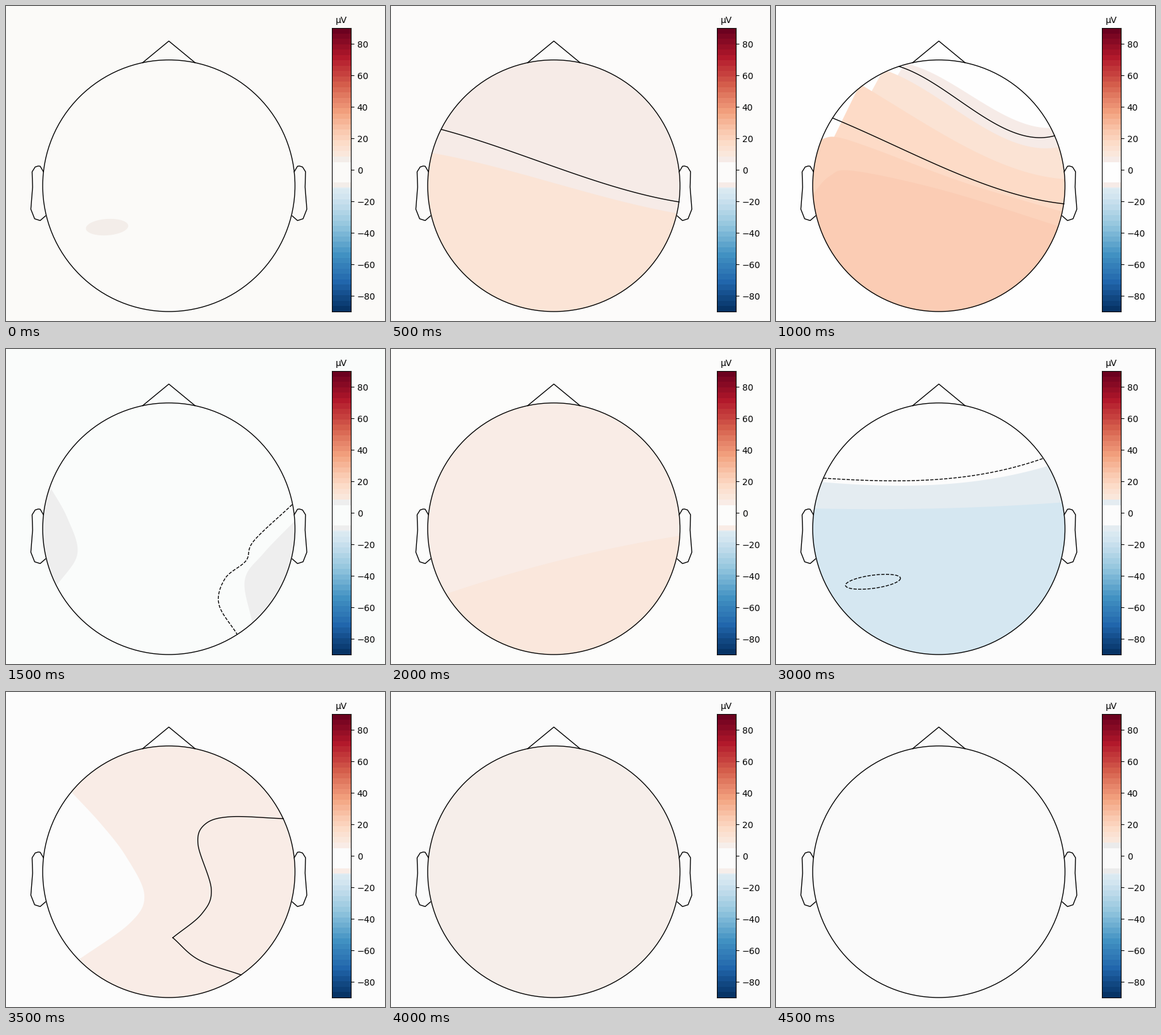
A matplotlib script that plays this animation: 600x500 px, repeating every 5000 ms.

```python
import numpy as np
import matplotlib
import matplotlib.pyplot as plt
from matplotlib.animation import FuncAnimation
from matplotlib.patches import Circle, Polygon

W, H, DPI = 600, 500, 100
CX, CY, R = 257.8, 285.3, 199.7
LIMIT = 90        # colour scale in microvolts
STEP = 3.4        # width of one colour band

# Corners that close a filled region on one side of its edge
DOWN = [(700, 600), (-100, 600)]
LEFT = [(-100, 600), (-100, 0)]
RIGHT = [(700, 600), (700, 200)]

plt.rcParams["font.family"] = "DejaVu Sans"
cmap = matplotlib.colormaps["RdBu_r"]
fig = plt.figure(figsize=(W / DPI, H / DPI), dpi=DPI)
ax = fig.add_axes([0, 0, 1, 1])
cax = fig.add_axes([516 / W, 15 / H, 30 / W, 450 / H])


def tint(uv):
    return cmap(0.5 + uv / (2 * LIMIT))


def swoop(start, end, bow=0, ease=0):
    """Edge from start to end: sagging by bow, flattened at its ends by ease."""
    u = np.linspace(0, 1, 60)
    s = u + ease * (u * u * (3 - 2 * u) - u)
    y = start[1] + (end[1] - start[1]) * s + 4 * bow * u * (1 - u)
    return np.c_[start[0] + (end[0] - start[0]) * u, y]


def through(*keys):
    """Catmull-Rom curve through a few key points."""
    p = np.array(keys, float)
    p = np.vstack([2 * p[0] - p[1], p, 2 * p[-1] - p[-2]])
    t = np.linspace(0, 1, 16)[:, None]
    return np.vstack([
        b + 0.5 * t * (c - a + t * (2 * a - 5 * b + 4 * c - d
                                    + t * (3 * (b - c) + d - a)))
        for a, b, c, d in zip(p, p[1:], p[2:], p[3:])])


def oval(x, y, rx, ry, tilt):
    a = np.linspace(0, 2 * np.pi, 80)
    return np.c_[x + rx * np.cos(a), y + ry * np.sin(a) - tilt * np.cos(a)]


def region(color, edge, corners=DOWN):
    return color, np.vstack([edge, corners])


def scene(bg, pale, fills=(), lines=(), style="-", base=None):
    return dict(bg=bg, pale=pale, fills=fills, lines=lines, style=style,
                base=base or bg)


def build():
    grey, warm, cool, rose = "#eeeeee", "#f9ece6", "#e4ecf1", "#f6ebe7"
    return [
        scene("#fbfaf8", "#f3ede9", [("#f3ede9", oval(160, 351, 33.5, 13, 2))]),
        scene("#fcfbfa", rose, base=rose,
              fills=[region(tint(12), swoop((58, 232), (458, 330), 0, 0.3))],
              lines=[swoop((80, 196), (456, 311), 5, 0.3)]),
        scene("#fefefe", rose, [
            region(rose, swoop((204, 91), (445, 193), 10, 0.9)),
            region(tint(13), swoop((170, 101), (452, 223), 20, 0.9)),
            region(tint(18), swoop((133, 124), (460, 275), 22, 0.3)),
            region(tint(20.5), through((70, 212), (95, 208), (150, 225),
                                       (300, 281), (458, 328))),
            region(tint(23), through((55, 303), (85, 270), (125, 262),
                                     (270, 294), (455, 352)))],
            [swoop((195, 96), (441, 206), 18, 0.95),
             swoop((90, 178), (456, 314), 14, 0.3)]),
        scene("#fafcfb", grey, [
            region(grey, through((68, 216), (97, 268), (113, 325), (80, 376)),
                   LEFT),
            region(grey, through((459, 271), (408, 324), (378, 367), (390, 435)),
                   RIGHT)],
            [through((453, 247), (392, 305), (380, 336), (347, 364), (337, 405),
                     (366, 453))], "--"),
        scene("#fcfcfb", warm, base=warm,
              fills=[region(tint(10), swoop((55, 400), (460, 296), -10))]),
        scene("#fefefc", warm, [
            region(warm, swoop((60, 230), (412, 151), 10)),
            region(tint(11.5), swoop((60, 338), (455, 228), -14, -0.3))],
            [swoop((59, 274), (430, 184), 4)]),
        scene("#fcfcfc", cool, [
            region(cool, swoop((70, 211), (436, 184), 18, -0.5)),
            region(tint(-16), swoop((57, 253), (460, 243), 5))],
            [swoop((75, 205), (422, 174), 18, -0.6),
             oval(153.5, 369.5, 43.5, 10.5, 5.5)], "--"),
        scene("#fcfcfc", warm, base=warm, fills=[
            region("#fcfcfc", through((100, 155), (150, 209), (190, 261),
                                      (219, 322), (196, 367), (112, 427)), LEFT)],
            lines=[through((439, 201), (355, 198), (315, 210), (304, 242),
                           (325, 313), (310, 352), (264, 390)),
                   through((264, 390), (305, 425), (372, 449))]),
        scene("#fbfbfb", "#f6eeea", base="#f6eeea"),
        scene("#fafafa", "#ebebeb"),
    ]


EAR = 2 * np.array([(.497, .0555), (.51, .0775), (.518, .0783), (.5299, .0746),
                    (.5419, .0555), (.54, -.0055), (.547, -.0932),
                    (.532, -.1313), (.51, -.1384), (.489, -.1199)])
NOSE_ANGLE = np.radians(12)
SIDE, FRONT = np.sin(NOSE_ANGLE), np.cos(NOSE_ANGLE)
NOSE = np.array([(-SIDE, FRONT), (0, 1.15), (SIDE, FRONT)])
SCENES = build()


def line(p, style="-"):
    ax.plot(p[:, 0], p[:, 1], color="black", lw=1, ls=style)


def outline():
    for shape in (EAR, EAR * (-1, 1), NOSE):
        line((CX, CY) + R * shape * (1, -1))
    ax.add_patch(Circle((CX, CY), R, fill=False, ec="black", lw=1, zorder=4))


def colorbar(s):
    def shade(v):
        if -8 < v < 5:
            return matplotlib.colors.to_rgba(s["bg"])
        if -11.2 < v < 8.4:
            return matplotlib.colors.to_rgba(s["pale"])
        return tint(STEP * round(v / STEP))

    cax.clear()
    rows = np.linspace(-LIMIT, LIMIT, 450)
    cax.imshow([[shade(v)] for v in rows], origin="lower", aspect="auto",
               extent=(0, 1, -LIMIT, LIMIT), interpolation="nearest")
    cax.set_xticks([])
    cax.set_yticks(range(-80, 81, 20))
    cax.yaxis.tick_right()
    cax.set_title("\u00b5V", fontsize=10)


def draw(i):
    s = SCENES[i]
    ax.clear()
    ax.set(xlim=(0, W), ylim=(H, 0))
    ax.axis("off")
    fig.set_facecolor(s["bg"])
    head = ax.add_patch(Circle((CX, CY), R, fc=s["base"], lw=0))
    for color, shape in s["fills"]:
        ax.add_patch(Polygon(shape, fc=color, lw=0)).set_clip_path(head)
    for curve in s["lines"]:
        line(curve, s["style"])
    outline()
    colorbar(s)
    return []


anim = FuncAnimation(fig, draw, frames=len(SCENES), interval=500,
                     init_func=lambda: draw(0), repeat=True, repeat_delay=0)
plt.show()
```
